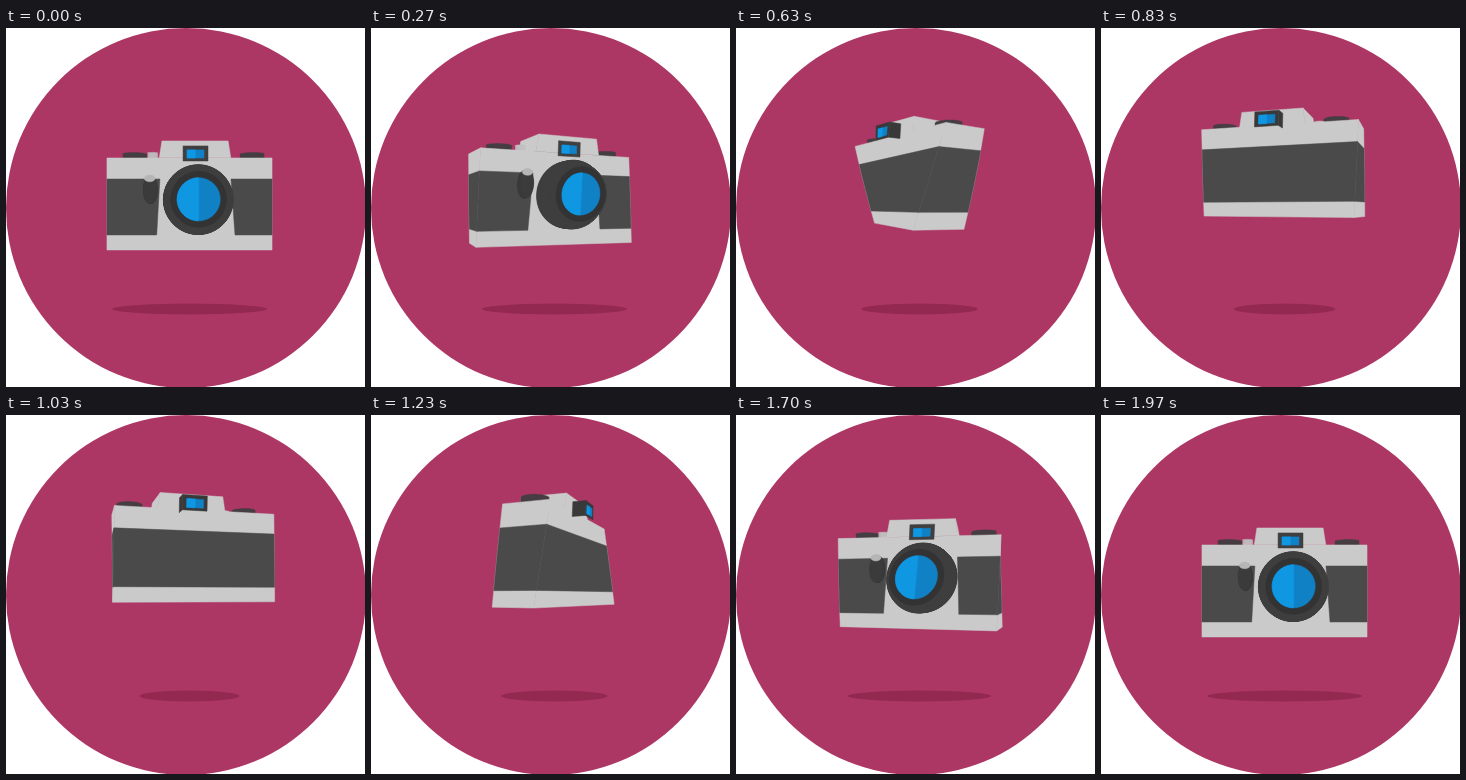
Write an HTML page with a canvas that moves like this. It is 359 px wide and 359 px high and loops after 2260 ms.

```html
<!DOCTYPE html>
<html lang="en">
<head>
<meta charset="utf-8">
<title>Turning camera</title>
<style>
  html, body { margin: 0; width: 100%; height: 100%; overflow: hidden; background: #fff; }
  canvas { display: block; width: 359px; height: 359px; }
</style>
</head>
<body>
<canvas id="stage" width="359" height="359"></canvas>
<script>
const ctx = document.getElementById('stage').getContext('2d');
const LOOP = 2260, FRAME = 100 / 3, START = 70, LAST = 57;
const EYE = 180, FOCUS = 400;
const LIGHT = '#cacaca', STRIP = '#4a4a4a', DARK = '#3f3f3f', RING = '#333333';
const BLUE = '#0f97e2', DEEP = '#1181c6';

// time, yaw, twist per unit of height, centre x, height, shadow radius
const KEYS = [
  [40, 0, 0, 183.5, -3.8, 77.5],
  [270, 22, .07, 180.3, -8.7, 72.5],
  [630, 114.7, .224, 175.5, -25.5, 58.5],
  [830, 158.2, .075, 181, -35, 51],
  [1000, 185, .04, 185.5, -37, 50],
  [1230, 241.4, .112, 190.5, -33.2, 53],
  [1470, 308.5, .172, 187, -23, 62.5],
  [1970, 360, 0, 183.5, -3.8, 77.5]
];

function slope(i, c) {
  if (i === 0 || i === KEYS.length - 1) return 0;
  const [a, b, d] = [KEYS[i - 1], KEYS[i], KEYS[i + 1]];
  const h0 = b[0] - a[0], h1 = d[0] - b[0];
  return (h1 * (b[c] - a[c]) / h0 + h0 * (d[c] - b[c]) / h1) / (h0 + h1);
}

// smooth curve through the keys
function value(t, c) {
  const end = KEYS.length - 1;
  if (t <= KEYS[0][0]) return KEYS[0][c];
  if (t >= KEYS[end][0]) return KEYS[end][c];
  let i = 0;
  while (KEYS[i + 1][0] <= t) i++;
  const a = KEYS[i], b = KEYS[i + 1], h = b[0] - a[0], u = (t - a[0]) / h, v = 1 - u;
  return a[c] * v * v * (1 + 2 * u) + b[c] * u * u * (3 - 2 * u) +
    h * u * v * (slope(i, c) * v - slope(i + 1, c) * u);
}

let yaw, twist, cx, cy;

function project(x, y, z) {
  const a = (yaw - twist * y) * Math.PI / 180, c = Math.cos(a), s = Math.sin(a);
  const k = FOCUS / (FOCUS + x * s - z * c);
  return [cx + (x * c + z * s) * k, EYE + (cy + y) * k];
}

function fill(points, color) {
  ctx.beginPath();
  points.forEach(p => ctx.lineTo(p[0], p[1]));
  ctx.closePath();
  ctx.fillStyle = ctx.strokeStyle = color;
  ctx.lineWidth = .5;
  ctx.fill();
  ctx.stroke();
}

function facesViewer(points) {
  return points.reduce((sum, p, i) => {
    const q = points[(i + 1) % points.length];
    return sum + p[0] * q[1] - q[0] * p[1];
  }, 0) > 0;
}

// upright face from a to b as seen from outside; ga and gb shift the lower corners
function wall(a, b, y0, y1, color, ga = 0, gb = 0) {
  const points = [], n = 5;
  for (let i = 0; i <= n; i++) points.push(project(b[0] + gb * i / n, y0 + (y1 - y0) * i / n, b[1]));
  for (let i = n; i >= 0; i--) points.push(project(a[0] + ga * i / n, y0 + (y1 - y0) * i / n, a[1]));
  if (facesViewer(points)) fill(points, color);
}

function box(x0, x1, z0, z1, y0, y1, color, grow = 0) {
  const corners = [[x0, z1], [x1, z1], [x1, z0], [x0, z0]];
  const shift = [-grow, grow, grow, -grow];
  corners.forEach((a, i) => {
    const j = (i + 1) % 4;
    wall(a, corners[j], y0, y1, color, shift[i], shift[j]);
  });
}

function arc(from, to, point) {
  const points = [];
  for (let i = 0; i <= 48; i++) {
    const a = from + (to - from) * i / 48;
    points.push(point(Math.cos(a), Math.sin(a)));
  }
  return points;
}

function disc(x, y, z, rx, ry, color, from = 0, to = Math.PI * 2) {
  fill(arc(from, to, (c, s) => project(x + rx * c, y + ry * s, z)), color);
}

function knob(x, z, r, color) {
  for (let y = -43; y >= -50; y--) {
    fill(arc(0, Math.PI * 2, (c, s) => project(x + r * c, y, z + r * s)), color);
  }
}

function body() {
  const w = 78, d = 22, top = -23.6, low = 29.3;
  box(-w, w, -d, d, -43.5, 43.5, LIGHT);
  wall([w, d], [w, -d], top, low, STRIP);
  wall([w, -d], [-w, -d], top, low, STRIP);
  wall([-w, -d], [-w, d], top, low, STRIP);
  wall([-w, d], [-28, d], top, low, STRIP, 0, -3);
  wall([39.2, d], [w, d], top, low, STRIP, 3.8, 0);
}

function lens() {
  const x = 8, y = -3.8, half = Math.PI / 2;
  for (let z = 22; z <= 51; z++) {
    const r = z < 36 ? 31.8 : 31.8 - (z - 36) * .42;
    disc(x, y, z, r, r, DARK);
  }
  disc(x, y, 51, 24.4, 24.4, RING);
  disc(x, y, 51, 18.8, 18.8, DEEP);
  disc(x, y, 51, 18.8, 18.8, BLUE, half, half * 3);
}

function frontParts() {
  wall([-6, 28], [17.2, 28], -53.9, -39.9, DARK);
  wall([-2.3, 28], [13.5, 28], -50.2, -42.7, DEEP);
  wall([-2.3, 28], [5.6, 28], -50.2, -42.7, BLUE);
  for (let z = 22; z <= 31; z++) disc(-36.5, -13, z, 6.2, 12.5, '#3b3b3b');
  disc(-36.7, -23.5, 31, 5, 3, '#b5b5b5');
  lens();
}

function eyepiece() {
  box(-6, 17.5, -31, -18, -55, -41, '#393939');
  wall([13.5, -31], [-2.5, -31], -51.5, -43.5, DEEP);
  wall([13.5, -31], [5.5, -31], -51.5, -43.5, BLUE);
}

function draw(t) {
  [yaw, twist, cx, cy] = [1, 2, 3, 4].map(c => value(t, c));
  ctx.clearRect(0, 0, 359, 359);
  ctx.fillStyle = '#ad3764';
  ctx.beginPath();
  ctx.arc(180, 180, 180, 0, Math.PI * 2);
  ctx.fill();
  ctx.fillStyle = '#932850';
  ctx.beginPath();
  ctx.ellipse(183.5, 281, value(t, 5), 5.4, 0, 0, Math.PI * 2);
  ctx.fill();

  const turn = yaw * Math.PI / 180, facing = Math.cos(turn), side = Math.sin(turn);
  const front = facing > .055, back = facing < -.055;
  const hump = () => box(-25.7, 36, -18, 27, -58.7, -43, LIGHT, 2.5);
  const left = () => { knob(-54.5, 0, 12, '#453d41'); knob(-36, 8, 5, '#c0c0c0'); };
  const right = () => knob(62.5, 0, 12, '#453d41');

  if (!front) frontParts();
  if (!back) eyepiece();
  (side > 0 ? [right, hump, left] : [left, hump, right]).forEach(part => part());
  body();
  if (front) frontParts();
  if (back) eyepiece();
}

// motion advances in thirtieths of a second
function tick(now) {
  const t = Math.floor(now % LOOP / 10) * 10;
  const n = Math.min(LAST, Math.floor((t - START + 7) / FRAME));
  draw(n < 0 ? 0 : START + n * FRAME);
  requestAnimationFrame(() => tick(performance.now() - begin));
}

const begin = performance.now();
tick(0);
</script>
</body>
</html>
```
